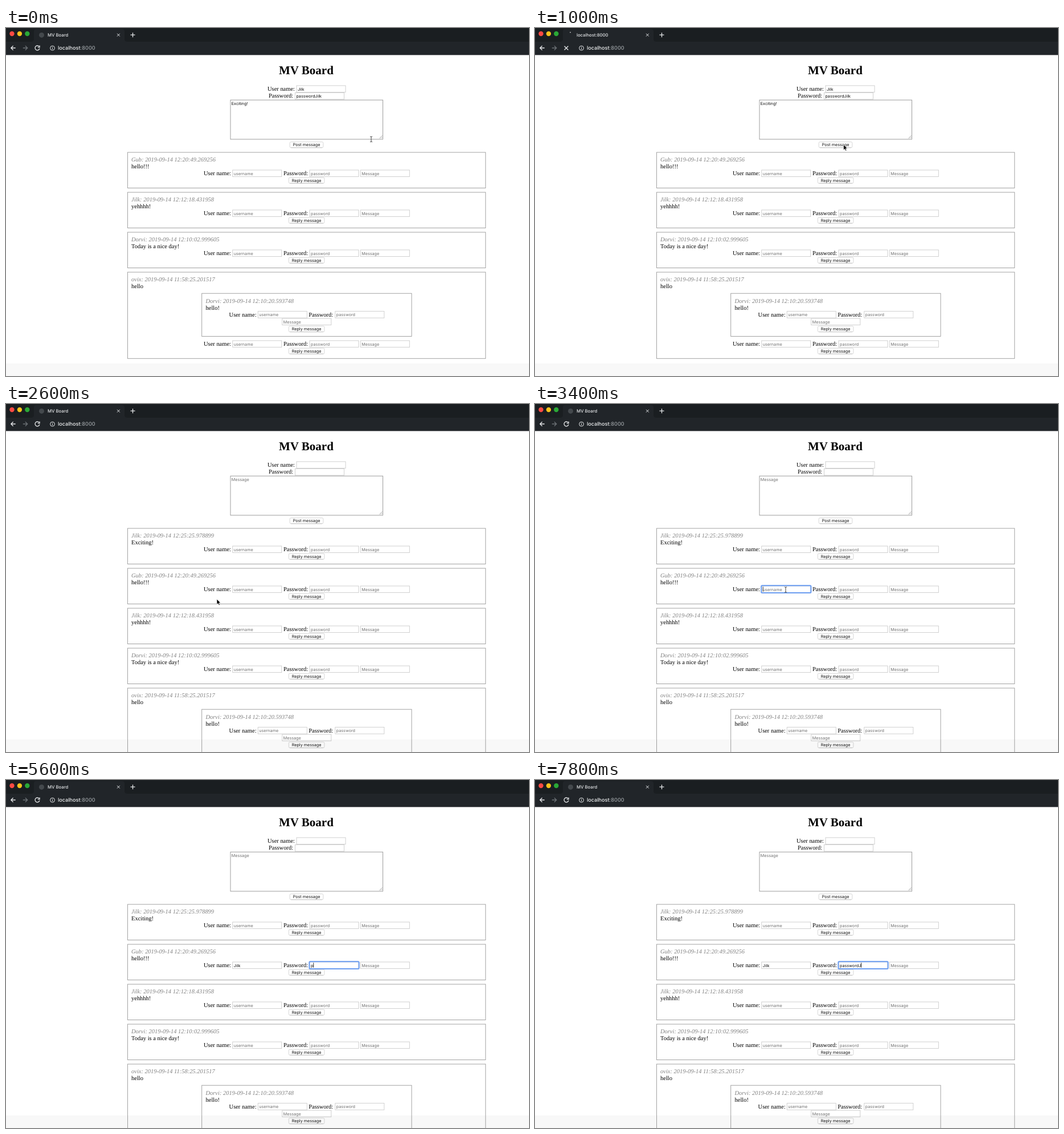
Write an HTML page that moves like this. It is 918 px wide and 610 px high and loops after 8000 ms.

```html
<!DOCTYPE html>
<html lang="en">
<head>
<meta charset="utf-8">
<title>MV Board</title>
<style>
html, body { margin: 0; width: 100%; height: 100%; overflow: hidden; background: #fff; }
svg { display: block; width: 918px; height: 610px; }
text { text-rendering: geometricPrecision; white-space: pre; }
.serif { font: 10.48px "Liberation Serif", serif; fill: #000; }
.stamp { font-style: italic; fill: #808080; }
.title { font: bold 21px "Liberation Serif", serif; }
.ui { font: 7.2px Inter, sans-serif; fill: #111; }
.hint { fill: #707070; }
.tab { font: 500 7.7px Inter, sans-serif; fill: #e4e6e8; }
.url { font: 500 9.1px Inter, sans-serif; fill: #f0f2f3; }
.icon { fill: none; stroke: #e6e8ea; stroke-width: 1.3; }
</style>
</head>
<body>
<svg id="stage" viewBox="0 0 918 610"></svg>
<script>
const LOOP = 8000, STEP = 200, POST = 1200;
const stage = document.getElementById('stage');

function el(parent, name, attrs = {}, content) {
  const node = document.createElementNS('http://www.w3.org/2000/svg', name);
  for (const key in attrs) node.setAttribute(key, attrs[key]);
  if (content !== undefined) node.textContent = content;
  parent.appendChild(node);
  return node;
}
const group = parent => el(parent, 'g');
const label = (p, x, y, str, cls = 'serif') => el(p, 'text', { x, y, class: cls }, str);
const box = (p, x, y, width, height, fill, stroke = 'none', rx = 0) =>
  el(p, 'rect', { x, y, width, height, fill, stroke, rx, 'stroke-width': 0.9 });
const icon = (p, d, attrs = {}) => el(p, 'path', { d, class: 'icon', ...attrs });
const show = (node, on) => node.setAttribute('visibility', on ? 'visible' : 'hidden');

function field(p, x, y, hint) {
  box(p, x, y, 86, 11.6, '#fff', '#cbcbcb');
  return label(p, x + 2, y + 8.7, hint, 'ui hint');
}

function button(p, x, y, width, str) {
  box(p, x, y, width, 10, '#fff', '#d2d2d2', 2);
  el(p, 'path', { d: `M${x + 2} ${y + 10.1}h${width - 4}`, stroke: '#bbb', 'stroke-width': 0.7 });
  el(p, 'text', { x: x + width / 2, y: y + 7.6, class: 'ui', 'text-anchor': 'middle' }, str);
}

function heading(p, x, y, stamp, body) {
  label(p, x, y, stamp, 'serif stamp');
  label(p, x, y + 12, body);
}

function replyRow(p, y) {
  label(p, 347, y + 9, 'User name:');
  label(p, 487, y + 9, 'Password:');
  const user = field(p, 397.8, y, 'username');
  const pass = field(p, 533, y, 'password');
  field(p, 622.3, y, 'Message');
  button(p, 496.3, y + 13.2, 62.6, 'Reply message');
  return { user, pass };
}

function card(p, y, stamp, body) {
  box(p, 213.5, y, 628.3, 62.5, '#fff', '#999');
  heading(p, 220, y + 16, stamp, body);
  return replyRow(p, y + 31);
}

function threadCard(p, y) {
  box(p, 213.5, y, 628.3, 151.3, '#fff', '#999');
  heading(p, 220, y + 16, 'ovix: 2019-09-14 11:58:25.201517', 'hello');
  box(p, 343.7, y + 37.2, 368.3, 75.3, '#fff', '#999');
  heading(p, 350.5, y + 53.7, 'Dorvi: 2019-09-14 12:10:20.593748', 'hello!');
  label(p, 391.6, y + 77.6, 'User name:');
  label(p, 531.2, y + 77.6, 'Password:');
  field(p, 442.3, y + 68.6, 'username');
  field(p, 577.8, y + 68.6, 'password');
  field(p, 484.8, y + 81, 'Message');
  button(p, 496.3, y + 94.6, 62.6, 'Reply message');
  replyRow(p, y + 120);
}

// page
box(stage, 0, 0, 918, 610, '#fff');
label(stage, 479, 81, 'MV Board', 'title');
label(stage, 459, 110, 'User name:');
label(stage, 461, 122.4, 'Password:');
const topUser = field(stage, 510, 101, '');
const topPass = field(stage, 507.4, 113.4, '');
box(stage, 394, 126.2, 267.5, 68.8, '#fff', '#929292');
icon(stage, 'M655.5 193.5l5-5M658 193.5l2.5-2.5', { style: 'stroke:#888;stroke-width:.7' });
const topText = label(stage, 395.8, 134.6, '', 'ui');
button(stage, 498.2, 199.7, 58.6, 'Post message');

const fresh = group(stage);
card(fresh, 218, 'Jilk: 2019-09-14 12:25:25.978899', 'Exciting!');
const older = group(stage);
const reply = card(older, 218, 'Gub: 2019-09-14 12:20:49.269256', 'hello!!!');
card(older, 288, 'Jilk: 2019-09-14 12:12:18.431958', 'yehhhh!');
card(older, 358, 'Dorvi: 2019-09-14 12:10:02.999605', 'Today is a nice day!');
threadCard(older, 428);
box(stage, 0, 588, 918, 22, 'rgba(0,0,0,.028)');

// browser bar
box(stage, 0, 0, 918, 47.4, '#212529');
box(stage, 0, 0, 918, 24, '#1a1e21');
el(stage, 'path', { d: 'M44 24q5 0 5-5V6q0-4 4-4h151q4 0 4 4v13q0 5 5 5z', fill: '#212529' });
['#fb4a43', '#f9c21b', '#2aa836'].forEach((fill, i) =>
  el(stage, 'circle', { cx: 10.5 + 13.4 * i, cy: 10, r: 4.2, fill }));
const favicon = el(stage, 'circle', { cx: 62.5, cy: 12.4, r: 4.5, fill: '#44494d' });
const spinner = el(stage, 'circle', { cx: 62, cy: 7.6, r: 0.9, fill: '#d5d8da' });
const tabTitle = label(stage, 73, 15, '', 'tab');
icon(stage, 'M195 9.8l4.8 4.8m0-4.8l-4.8 4.8', { style: 'stroke-width:1' });
icon(stage, 'M218.5 12.2h8M222.5 8.2v8');
icon(stage, 'M16.7 35H8.8m3.8-3.8L8.8 35l3.8 3.8');
icon(stage, 'M29.8 35h7.9m-3.8-3.8l3.8 3.8-3.8 3.8', { style: 'stroke:#6c7175' });
const reload = icon(stage, 'M58 32.3A4 4 0 1 0 58.9 36M59 30.8v3.1h-3.2');
const stop = icon(stage, 'M51.5 31.7l6.8 6.8m0-6.8l-6.8 6.8');
el(stage, 'circle', { cx: 81.5, cy: 35.2, r: 3.9, class: 'icon', style: 'stroke-width:1' });
icon(stage, 'M81.5 34.5v2.8M81.5 32.8v1', { style: 'stroke-width:1' });
const url = label(stage, 91, 38.4, 'localhost', 'url');
el(url, 'tspan', { fill: '#9ba0a4' }, ':8000');

// focus and pointers
const ring = el(stage, 'rect', { y: 318.3, width: 87.2, height: 12.8, rx: 1.5,
  fill: 'none', stroke: '#6a9cf0', 'stroke-width': 2 });
const caret = el(stage, 'rect', { y: 320.3, width: 0.8, height: 8.6, fill: '#000' });
const arrow = el(stage, 'path', { d: 'M0 0v9.4l2.2-2 1.6 3.4 1.6-.7-1.5-3.3h3z',
  fill: '#000', stroke: '#fff', 'stroke-width': 0.7 });
const beam = el(stage, 'path', { d: 'M-2-4.8q2 0 2 1.2 0-1.2 2-1.2M0-3.6v7.2M-2 4.8q2 0 2-1.2 0 1.2 2 1.2',
  fill: 'none', stroke: '#333', 'stroke-width': 0.9 });

// [time, shape, x, y]
const pointer = [
  [0, beam, 641, 195], [200, beam, 634, 194], [400, arrow, 604, 201], [600, arrow, 563, 205],
  [800, arrow, 541.5, 204.5], [1600, arrow, 520, 211], [1800, arrow, 404, 230],
  [2000, beam, 276, 243], [2200, beam, 264, 244], [2400, arrow, 322, 298],
  [2600, arrow, 370, 342], [2800, arrow, 438, 350], [3000, beam, 440, 325.5], [3800, null, 0, 0]
];
const userTyping = [[0, ''], [3800, 'J'], [4200, 'Ji'], [4400, 'Jil'], [4800, 'Jilk']];
const passTyping = [[0, ''], [5600, 'p'], [6000, 'pa'], [6200, 'pas'], [6400, 'pass'],
  [6600, 'passwo'], [6800, 'passwor'], [7200, 'password'], [7600, 'passwordJ']];
const at = (table, t) => table.filter(row => row[0] <= t).pop();

function setText(node, value, hint) {
  const str = value || hint;
  if (node.textContent !== str) node.textContent = str;
  node.setAttribute('class', value ? 'ui' : 'ui hint');
}

function draw(t) {
  const posted = t >= POST, loading = t >= 1000 && !posted;
  setText(topUser, posted ? '' : 'Jilk', '');
  setText(topPass, posted ? '' : 'passwordJilk', '');
  setText(topText, posted ? '' : 'Exciting!', 'Message');
  show(fresh, posted);
  older.setAttribute('transform', `translate(0 ${posted ? 70 : 0})`);

  tabTitle.textContent = loading ? 'localhost:8000' : 'MV Board';
  show(favicon, !loading);
  show(spinner, loading);
  show(reload, !loading);
  show(stop, loading);

  const user = at(userTyping, t)[1], pass = at(passTyping, t)[1];
  setText(reply.user, user, 'username');
  setText(reply.pass, pass, 'password');

  const focused = t >= 3400, inPass = t >= 5200;
  const node = inPass ? reply.pass : reply.user;
  const typed = inPass ? pass : user;
  show(ring, focused);
  show(caret, focused);
  ring.setAttribute('x', inPass ? 532.4 : 397.2);
  caret.setAttribute('x', +node.getAttribute('x') + (typed ? node.getComputedTextLength() : 0));

  const [, shape, x, y] = at(pointer, t);
  for (const p of [arrow, beam]) show(p, p === shape);
  if (shape) shape.setAttribute('transform', `translate(${x} ${y})`);
}

const start = performance.now();
function tick() {
  const t = (performance.now() - start) % LOOP;
  draw(Math.floor(t / STEP) * STEP);
  requestAnimationFrame(tick);
}
draw(0);
requestAnimationFrame(tick);
</script>
</body>
</html>
```
